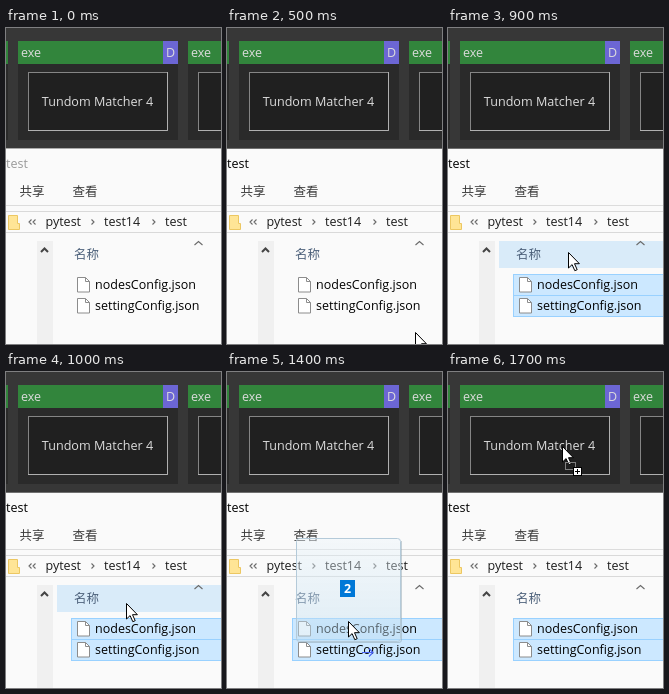
Animation of 215 by 316 pixels, one loop 2.4 s. Source, as an HTML page:

```html
<!DOCTYPE html>
<html lang="zh-CN">
<head>
<meta charset="utf-8">
<title>Drag files onto a node</title>
<style>
  html, body { margin: 0; width: 100%; height: 100%; overflow: hidden; background: #fafafa; }
  svg { display: block; width: 100vw; height: 100vh; }
  text { font: 12.5px "Open Sans", "Noto Sans CJK SC", "Noto Sans CJK", sans-serif; fill: #000; }
  .label { fill: #dcdcdc; }
  .ribbon text { fill: #3c3c3c; }
  .path text { fill: #1c1c1c; }
  .line { fill: none; stroke: #6a6a6a; stroke-width: 1.1; }
  .row { fill: #cce8ff; stroke: #99d1ff; }

  .title, .edge, .rows, .marquee, .hover, .cursor, .ghost, .copy {
    animation: 2400ms step-end infinite;
  }
  .title { animation-name: title; }
  .edge { animation-name: edge; }
  .rows { animation-name: rows; }
  .marquee { animation-name: marquee; }
  .hover { animation-name: hover; }
  .cursor { animation-name: move; }
  .ghost { animation-name: ghost; }
  .copy { animation-name: copy; }

  @keyframes title { 0% { fill: #999; } 16.66%, 100% { fill: #000; } }
  @keyframes edge { 0% { fill: #aaa; } 16.66%, 100% { fill: #707070; } }
  @keyframes rows { 0% { opacity: 0; } 25%, 100% { opacity: 1; } }
  @keyframes marquee { 0% { opacity: 0; } 25% { opacity: 1; } 37.5%, 100% { opacity: 0; } }
  @keyframes hover { 0% { opacity: 0; } 37.5% { opacity: 1; } 45.83%, 100% { opacity: 0; } }
  @keyframes ghost { 0% { opacity: 0; } 58.33% { opacity: 1; } 70.83%, 100% { opacity: 0; } }
  @keyframes copy { 0% { opacity: 0; } 70.83%, 100% { opacity: 1; } }
  @keyframes move {
    0% { transform: translate(133px, 282px); opacity: 0; }
    16.66% { transform: translate(133px, 282px); opacity: 1; }
    20.83% { transform: translate(188px, 304px); opacity: 1; }
    25% { transform: translate(120px, 224px); opacity: 1; }
    41.66% { transform: translate(120px, 231px); opacity: 1; }
    45.83% { transform: translate(120px, 251px); opacity: 1; }
    50% { transform: translate(121px, 268px); opacity: 1; }
    54.16% { transform: translate(121px, 263px); opacity: 1; }
    58.33% { transform: translate(121px, 249px); opacity: 1; }
    62.5% { transform: translate(122px, 204px); opacity: 1; }
    66.66% { transform: translate(124px, 157px); opacity: 1; }
    70.83%, 100% { transform: translate(114px, 74px); opacity: 1; }
  }
</style>
</head>
<body>
<svg viewBox="0 0 215 316" preserveAspectRatio="none">
  <defs>
    <g id="box">
      <rect width="160" height="99" fill="#2a2a2a"/>
      <rect width="145" height="23" fill="#32853c"/>
      <rect x="145" width="15" height="23" fill="#6c66d4"/>
      <rect x="10.5" y="31.5" width="139" height="58" fill="#202020" stroke="#858585"/>
      <path d="M10 89.5h139.5v-58.500" fill="none" stroke="#b0b0b0"/>
      <text class="label" x="3" y="16">exe</text>
      <text class="label" x="148" y="16">D</text>
    </g>
    <g id="file">
      <path d="M.5 .5h8l4 4v10.500h-12z" fill="#fff" stroke="#8c8c8c"/>
      <path d="M8.500 .5v4h4" fill="none" stroke="#8c8c8c"/>
    </g>
    <path id="chevron" class="line" d="M0 0l2.500 2.500l-2.500 2.500"/>
    <linearGradient id="glass" x2="0" y2="1">
      <stop offset="0" stop-color="#eaf4fa" stop-opacity=".4"/>
      <stop offset="1" stop-color="#bcdcf0" stop-opacity=".45"/>
    </linearGradient>
  </defs>

  <rect width="215" height="120" fill="#373737"/>
  <rect y="13" width="2" height="99" fill="#2a2a2a"/>
  <rect y="13" width="2" height="23" fill="#32853c"/>
  <use href="#box" x="12" y="13"/>
  <use href="#box" x="182" y="13"/>
  <text class="label" x="91.500" y="78" text-anchor="middle" style="font-size:12.6px">Tundom Matcher 4</text>

  <rect y="120" width="215" height="196" fill="#fafafa"/>
  <rect class="edge" y="120" width="215" height="1"/>
  <text class="title" x="0" y="140">test</text>
  <g class="ribbon">
    <text x="13.500" y="168">共享</text>
    <text x="66.500" y="168">查看</text>
  </g>
  <rect y="177" width="215" height="1" fill="#dcdcdc"/>

  <g class="path">
    <path d="M-1 183.500H216M-1 204.500H216" stroke="#d9d9d9"/>
    <path d="M2.500 187.500h9v8h2v6h-11z" fill="#ffe596" stroke="#ecc762"/>
    <path class="line" d="M25.500 191.500l-2.500 2.500l2.500 2.500M29.500 191.500l-2.500 2.500l2.500 2.500"/>
    <text x="39.500" y="198">pytest</text>
    <use href="#chevron" x="85.500" y="191.500"/>
    <text x="98" y="198">test14</text>
    <use href="#chevron" x="146.500" y="191.500"/>
    <text x="159" y="198">test</text>
  </g>

  <rect x="31" y="213" width="16" height="103" fill="#f0f0f0"/>
  <path class="line" d="M35 224l3.500-3.500l3.500 3.500" style="stroke:#444;stroke-width:2"/>

  <rect class="hover" x="51" y="213" width="164" height="27" fill="#d9ebf9"/>
  <path class="line" d="M188.500 217l4-3.500l4 3.500"/>
  <text x="68" y="231" style="fill:#4c607a">名称</text>

  <g class="rows">
    <rect class="row" x="65.500" y="246.500" width="151" height="21"/>
    <rect class="row" x="65.500" y="267.500" width="151" height="21"/>
  </g>
  <use href="#file" x="71" y="249"/>
  <use href="#file" x="71" y="270"/>
  <text x="89" y="261">nodesConfig.json</text>
  <text x="89" y="282">settingConfig.json</text>
  <rect class="marquee" x="120.500" y="240.500" width="71" height="80"
        fill="#0067c0" fill-opacity=".34" stroke="#0078d7"/>

  <g class="cursor">
    <g class="ghost">
      <path d="M53.500 -80v99q0 2.500 -2.500 2.500h-100" fill="none" stroke="#8fa3b0" stroke-opacity=".5"/>
      <rect x="-51.500" y="-82.500" width="104" height="103" rx="3" fill="url(#glass)" stroke="#b4cad9"/>
      <rect x="-8" y="-41" width="15" height="17" fill="#0078d7"/>
      <text x="-.5" y="-28" text-anchor="middle" style="fill:#fff;font-weight:700">2</text>
      <path d="M14 31.500h11M21 27.500l4 4l-4 4" fill="none" stroke="#4a62f0" stroke-width="1.1"/>
    </g>
    <path d="M.5 .5v15.500l3.600-3.400l2.700 6.100l2.400-1l-2.700-6h4.900z" fill="#fff" stroke="#000"/>
    <g class="copy">
      <rect x="3.500" y="16.500" width="10" height="7" fill="none" stroke="#fff"/>
      <rect x="3.500" y="16.500" width="10" height="7" fill="none" stroke="#000" stroke-dasharray="1"/>
      <rect x="11.500" y="21.500" width="8" height="8" fill="#fff" stroke="#000"/>
      <path d="M13 25.500h5M15.500 23v5" stroke="#000"/>
    </g>
  </g>
</svg>
</body>
</html>
```
